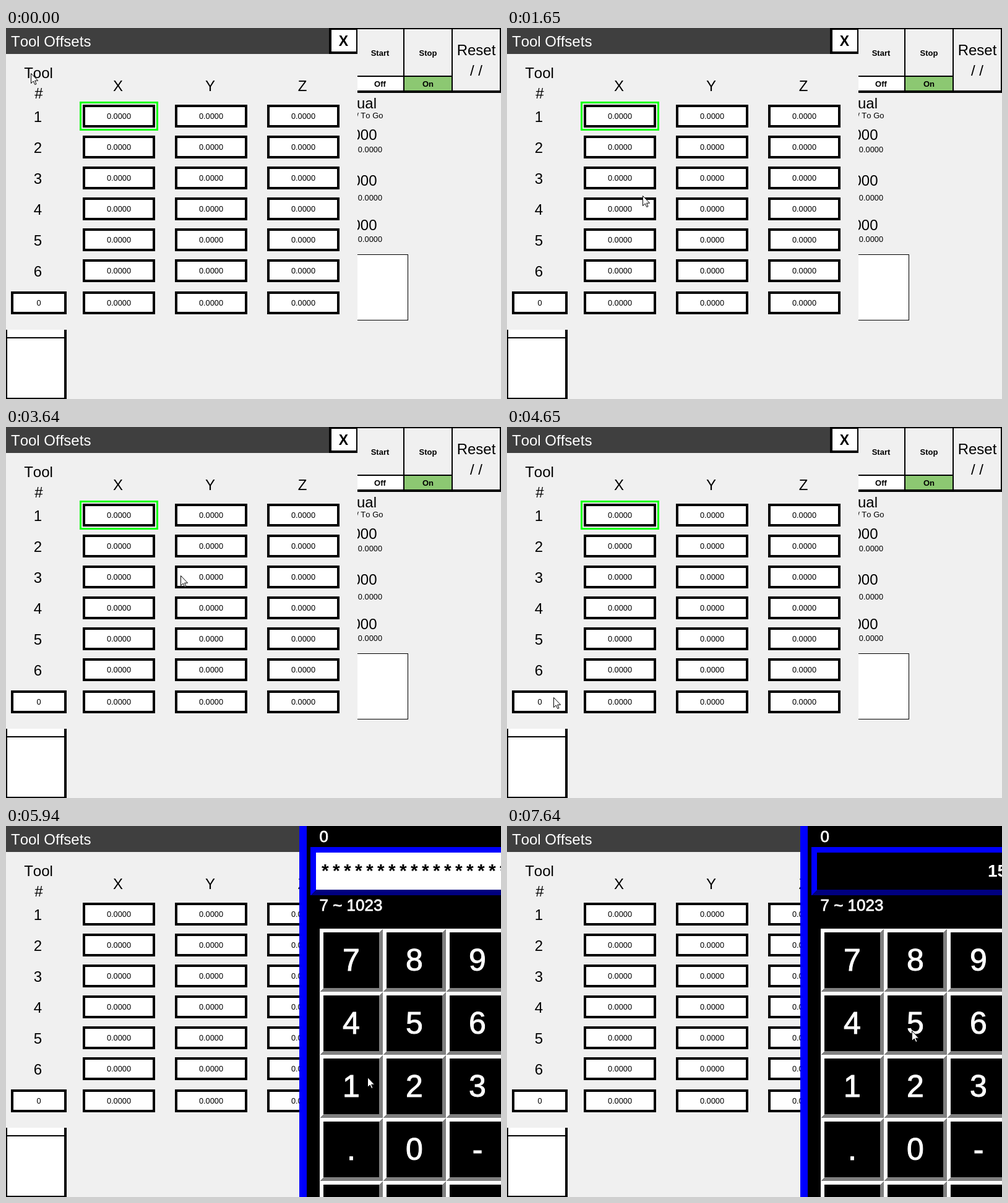
These frames come from a looping animation (800 by 600 pixels, 8 s). An HTML page:

```html
<!DOCTYPE html>
<html lang="en">
<head>
<meta charset="utf-8">
<title>Tool Offsets</title>
<style>
  html, body { margin: 0; width: 100%; height: 100%; overflow: hidden; background: #f0f0f0; }
  svg { display: block; }
  polygon { shape-rendering: crispEdges; }
  text { font-family: "Liberation Sans", Arial, sans-serif; font-kerning: none; white-space: pre; }
</style>
</head>
<body>
<svg id="stage" width="800" height="600" viewBox="0 0 800 600"></svg>
<script>
const NS = 'http://www.w3.org/2000/svg';
const LOOP = 8000;
const OPEN_AT = 4800, ONE_AT = 6190, FIVE_AT = 6960;
let layer = document.getElementById('stage');

function add(tag, attrs) {
  const el = document.createElementNS(NS, tag);
  for (const name in attrs) el.setAttribute(name, attrs[name]);
  return layer.appendChild(el);
}
function group(build) {
  const outer = layer, g = add('g', {});
  layer = g;
  build();
  layer = outer;
  return g;
}
const rect = (x, y, width, height, fill = '#000') => add('rect', { x, y, width, height, fill });
const poly = (points, fill) => add('polygon', { points, fill });
const move = (el, x, y) => el.setAttribute('transform', `translate(${x} ${y})`);
const show = (el, on) => { el.style.display = on ? '' : 'none'; };

const bold = { 'font-weight': 'bold' };
const start = { 'text-anchor': 'start' };
const end = { 'text-anchor': 'end' };
const white = { fill: '#fff' };
const heavy = width => ({ ...white, stroke: '#fff', 'stroke-width': width });
const SMALL = 12.8;

function label(str, x, y, size = 24, more = {}) {
  const el = add('text', { x, y, 'font-size': size, 'text-anchor': 'middle', ...more });
  el.textContent = str;
  return el;
}
function field(x, y, w, str) {
  rect(x, y, w, 37);
  rect(x + 4, y + 4, w - 8, 29, '#fff');
  label(str, x + w / 2, y + 23, SMALL);
}

function machineScreen() {
  // Start, stop and reset buttons
  rect(560, 0, 240, 2);
  rect(560, 77, 162, 2);
  rect(560, 79, 82, 22, '#fff');
  rect(644, 79, 76, 22, '#8cc872');
  rect(560, 101, 240, 4);
  for (const x of [642, 720, 798]) rect(x, 0, 2, 103);
  label('Start', 604.5, 45, 13, bold);
  label('Stop', 682, 45, 13, bold);
  label('Off', 604.5, 95, 13, bold);
  label('On', 682, 95, 13, bold);
  label('Reset', 760, 44);
  label('/ /', 760, 77);

  // Position readout, partly behind the dialog
  label('ual', 599, 130, 24, end);
  label('/ To Go', 609.5, 146, 13, end);
  for (const [y, small] of [[181, 201], [255, 279], [327, 346]]) {
    label('000', 599.5, y, 24, end);
    label('0.0000', 608, small, SMALL, end);
  }
  rect(560, 366, 90, 107);
  rect(560, 367, 89, 105, '#fff');

  rect(0, 488, 98, 112);
  rect(2, 488, 92, 12, '#fff');
  rect(2, 502, 92, 96, '#fff');
}

function offsetsDialog() {
  rect(0, 0, 568, 488, '#f0f0f0');
  rect(0, 0, 522, 42, '#3f3f3f');
  label('Tool Offsets', 8, 30, 24, { ...start, ...white });
  rect(522, 0, 46, 42);
  rect(526, 3, 40, 35, '#fff');
  label('X', 545.5, 29, 23, bold);
  label('Tool', 52.5, 81);
  label('#', 53, 114);

  const columns = [...'XYZ'].map((name, i) => ({ name, x: 124 + 149 * i }));
  for (const { name, x } of columns) label(name, x + 57, 102);
  for (let row = 0; row < 6; row++) {
    label(row + 1, 51.5, 152 + 50 * row);
    for (const { x } of columns) field(x, 124 + 50 * row, 117, '0.0000');
  }
  field(8, 426, 90, '0');
  for (const { x } of columns) field(x, 426, 117, '0.0000');
}

function key(x, y, str) {
  move(group(() => {
    rect(0, 0, 102, 102, '#fff');
    poly('102,0 102,102 0,102 6,96 96,96 96,6', '#808080');
    rect(6, 6, 90, 90);
    label(str, 51, 68, 50, heavy(1));
  }), x, y);
}

let entryBox, stars, entry;
function keypad() {
  rect(474, 0, 326, 600);
  rect(474, 0, 12, 600, '#00f');
  const caption = { ...start, ...heavy(0.8) };
  label('0', 506.5, 26, 26, caption);
  label('7 ~ 1023', 506.5, 137, 26, caption);
  rect(492, 34, 308, 78, '#00f');
  poly('501,103 800,103 800,112 492,112', '#000080');
  entryBox = rect(501, 43, 299, 60, '#fff');
  stars = label('*'.repeat(17), 510, 82, 30, { ...start, ...bold, 'letter-spacing': 6.33 });
  entry = label('', 0, 82, 28, { ...start, ...bold, ...white });
  [...'789456123.0-   '].forEach((c, i) =>
    key(507 + 102 * (i % 3), 166 + 102 * Math.floor(i / 3), c));
}

group(machineScreen);
group(offsetsDialog);
const focus = add('rect', { x: 120.5, y: 120.5, width: 124, height: 44, fill: 'none', stroke: '#0f0', 'stroke-width': 3 });
const pad = group(keypad);
const pointer = add('path', {
  d: 'M.5 .5V16.5L4.2 13L6.8 18.5L9 17.6L6.6 12.2H11.6Z', fill: '#fff', stroke: '#000'
});

// Each glide bends from the last resting place towards its own, in even steps
const home = [40, 73];
const glides = [
  { from: 140, to: 1100, steps: 8, bend: [200, 150], rest: [381, 162] },
  { from: 1230, to: 2230, steps: 8, bend: [71, 346], rest: [353, 230] },
  { from: 3640, to: 4650, steps: 8, bend: [47, 261], rest: [75, 437] },
  { from: 4940, to: 5660, steps: 6, bend: [330, 432], rest: [588, 405] },
  { from: 5940, to: 6960, steps: 9, bend: [563, 414], rest: [656, 331] },
  { from: 7640, to: 7780, steps: 1, bend: [655, 331], rest: [654, 331] }
];

function pointerAt(t) {
  const i = glides.findLastIndex(g => g.from <= t);
  if (i < 0) return home;
  const { from, to, steps, bend, rest } = glides[i];
  const origin = i ? glides[i - 1].rest : home;
  // The clock ticks in hundredths of a second, hence the 9 ms lead
  const done = 1 + Math.floor((t + 9 - from) / (to - from) * (steps - 1));
  const u = Math.min(1, done / steps), v = 1 - u;
  return rest.map((r, a) => Math.round(v * v * origin[a] + 2 * u * v * bend[a] + u * u * r));
}

function draw(t) {
  move(pointer, ...pointerAt(t));
  show(pad, t >= OPEN_AT);
  show(focus, t < OPEN_AT);
  const typed = t >= FIVE_AT ? '15' : t >= ONE_AT ? '1' : '';
  show(stars, !typed);
  entryBox.setAttribute('fill', typed ? '#000' : '#fff');
  entry.textContent = typed;
  entry.setAttribute('x', 808 - 15.5 * typed.length);
}

const begin = performance.now();
function tick() {
  draw((performance.now() - begin) % LOOP);
  requestAnimationFrame(tick);
}
tick();
</script>
</body>
</html>
```
